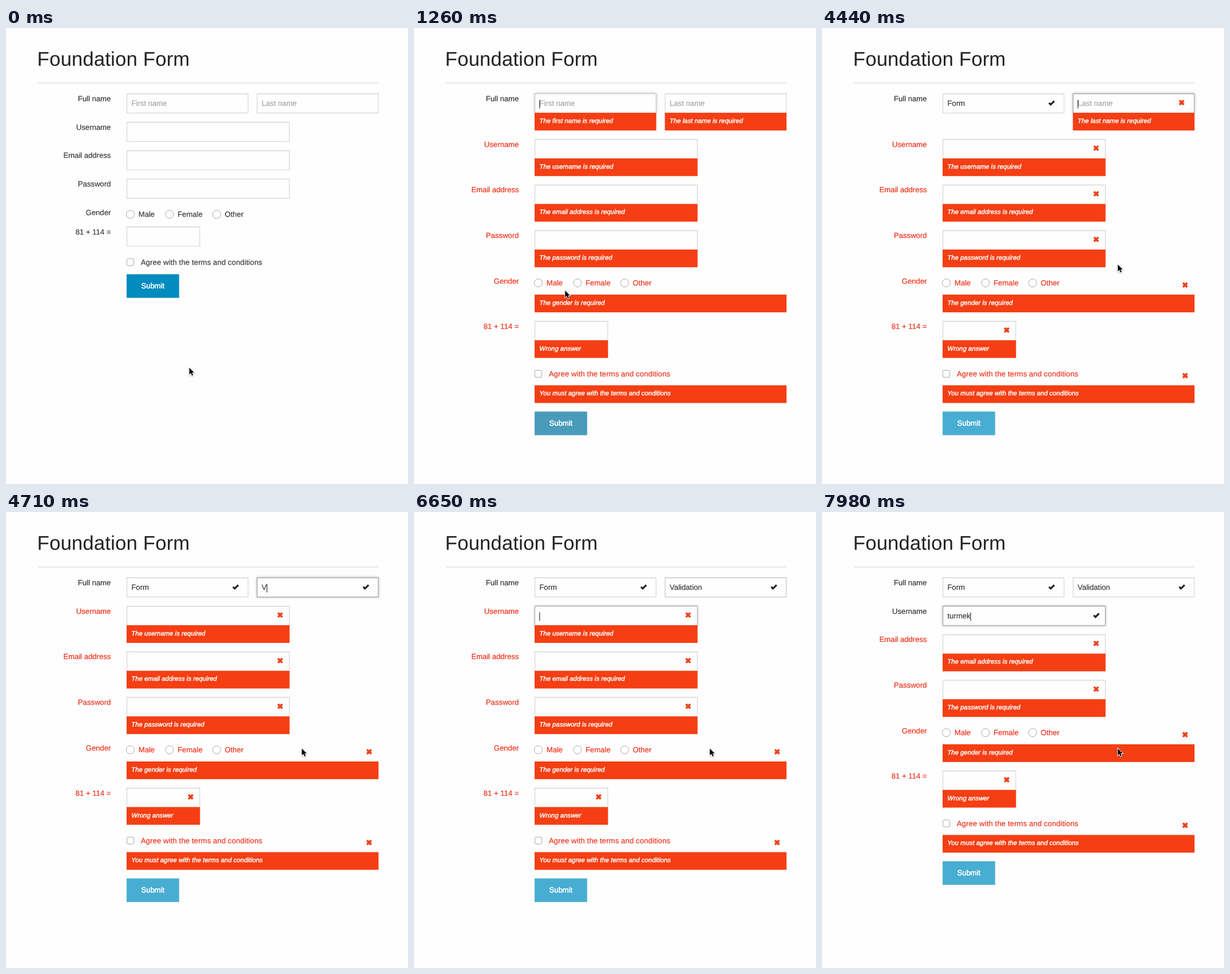
Recreate the animation shown at these times as an HTML page. Size 703 by 797 pixels, loop 8 s.

```html
<!DOCTYPE html>
<html lang="en">
<head>
<meta charset="utf-8">
<title>Foundation Form</title>
<style>
  html, body { margin: 0; width: 100%; height: 100%; overflow: hidden; background: #fefefe; }
  svg { display: block; width: 703px; height: 797px; }
  text { font: 14px "Liberation Sans", Arial, Helvetica, sans-serif; fill: #3a3a3a; stroke: #3a3a3a; stroke-width: .2px; text-rendering: geometricPrecision; white-space: pre; }
  .title { font-size: 37px; fill: #222; stroke: none; letter-spacing: .2px; }
  .label { text-anchor: end; }
  .terms { letter-spacing: .12px; }
  .err .tint { fill: #f0301a; stroke: #f0301a; }
  .hint { fill: #aaa; stroke: #aaa; stroke-width: .3px; }
  .box { fill: #fefefe; stroke: #ccc; }
  .focus { filter: drop-shadow(0 0 2px rgba(0,0,0,.3)); }
  .round { fill: #fff; stroke: #a2a2a2; }
  .bar { fill: #f53e13; }
  .msg { font-size: 12px; font-style: italic; fill: #fff; stroke: #fff; stroke-width: .5px; letter-spacing: .05px; }
  .cross { stroke: #f0401a; stroke-width: 3.9; }
  .check { stroke: #222; stroke-width: 3.4; fill: none; }
  .submit { text-anchor: middle; fill: #fff; stroke: #fff; stroke-width: .55px; }
  .ring { filter: drop-shadow(0 0 2px #5b9dd9) drop-shadow(0 0 1px #5b9dd9); }
  .arrow { fill: #000; stroke: #fff; stroke-width: 2; paint-order: stroke; filter: drop-shadow(0 1px 1px rgba(0,0,0,.3)); }
</style>
</head>
<body>
<svg id="stage" viewBox="0 0 750 850" preserveAspectRatio="none"></svg>
<script>
const LOOP = 8000, SHOWN = 1260, ICONS = 1510;
const LEFT = 225, BAR = 33, LINE = 18;

// y: resting top, grow: extra height while the row has an error
const rows = [
  { y: 122, grow: 32, label: 'Full name', plain: true },
  { y: 175, grow: 32, label: 'Username' },
  { y: 228, grow: 32, label: 'Email address' },
  { y: 281, grow: 32, label: 'Password' },
  { y: 334, grow: 48, label: 'Gender' },
  { y: 370, grow: 32, label: '81 + 114 =' },
  { y: 423, grow: 48 },
  { y: 459, grow: 0 }
];

const fields = [
  { row: 0, x: LEFT, w: 227, inset: 24, hint: 'First name', msg: 'The first name is required',
    value: 'Form', keys: [3030, 3480, 3660, 3840], need: 1, focus: [1260, 4010], fade: 1160, caret: 1260 },
  { row: 0, x: 468, w: 227, inset: 24, hint: 'Last name', msg: 'The last name is required',
    value: 'Validation', keys: [4710, 4880, 4970, 5150, 5240, 5330, 5590, 5680, 5860, 6130],
    need: 1, focus: [4010, 6390], fade: 4010, caret: 4270 },
  { row: 1, x: LEFT, w: 304, msg: 'The username is required',
    value: 'turmek', keys: [6910, 7000, 7090, 7260, 7800, 7980], need: 6, focus: [6390, LOOP], fade: 6390, caret: 6390,
    long: ['The username must be more than 6 and less than 30', 'characters long'] },
  { row: 2, x: LEFT, w: 304, msg: 'The email address is required' },
  { row: 3, x: LEFT, w: 304, msg: 'The password is required' },
  { row: 4, x: LEFT, w: 470, msg: 'The gender is required', bare: true },
  { row: 5, x: LEFT, w: 137, msg: 'Wrong answer' },
  { row: 6, x: LEFT, w: 470, msg: 'You must agree with the terms and conditions', bare: true }
];

const stage = document.getElementById('stage');
const text = (cls, x, y, s) => `<text class="${cls}" x="${x}" y="${y}">${s}</text>`;
const rect = (cls, x, y, w, h, more = '') => `<rect class="${cls}" x="${x}" y="${y}" width="${w}" height="${h}" ${more}/>`;

function fieldMarkup(f) {
  const bar = f.bare ? 35 : 36, tx = f.x + 9;
  const input = f.bare ? '' :
    rect('box', f.x + .5, .5, f.w - 1, 36) +
    rect('', f.x + 1, 1, f.w - 2, 1, 'opacity=".06"') +
    text('hint', tx, 23.5, f.hint || '') + text('value', tx, 23.5, '') +
    rect('caret', tx, 12, 1, 16);
  return `<g class="field">${input}
    <g class="error">${rect('bar', f.x, bar, f.w, BAR)}${text('msg', tx, bar + 19, f.msg)}${text('msg', tx, bar + 19 + LINE, '')}</g>
    <g transform="translate(${f.x + f.w - (f.inset || 17.5)} 17)">
      <path class="cross" d="M-4-4 4 4M-4 4 4-4"/>
      <path class="check" d="M-4.5.6-1.3 3.7 5.4-2.9"/>
    </g></g>`;
}

function extras(i) {
  if (i === 4) return [['Male', 232, 247.2], ['Female', 305, 320], ['Other', 393, 408]]
    .map(([s, cx, x]) => `<circle class="round" cx="${cx}" cy="13.3" r="7.5"/>` + text('tint', x, 18, s)).join('');
  if (i === 6) return rect('round', 225.5, 7, 13, 13, 'rx="2.5"') +
    text('tint terms', 251.5, 18, 'Agree with the terms and conditions');
  if (i === 7) return rect('button', LEFT, 0, 98, 44) + text('submit', 274, 26.5, 'Submit');
  return '';
}

stage.innerHTML = text('title', 58.2, 70, 'Foundation Form') + rect('', 59, 102, 636, 1, 'fill="#d0d0d0"') +
  rows.map((r, i) => `<g class="row">${r.label ? text('label' + (r.plain ? '' : ' tint'), 195.6, 14.5, r.label) : ''}
    ${extras(i)}${fields.filter(f => f.row === i).map(fieldMarkup).join('')}</g>`).join('') +
  '<path class="arrow" d="M0 0V12.5L2.9 9.8 5 14.6 7 13.7 5 9.1H9Z"/>';

const all = s => [...stage.querySelectorAll(s)];
all('.row').forEach((el, i) => rows[i].el = el);
all('.field').forEach((el, i) => {
  const part = s => el.querySelector(s);
  Object.assign(fields[i], { box: part('.box'), hintEl: part('.hint'), valueEl: part('.value'), caretEl: part('.caret'),
    error: part('.error'), barEl: part('.bar'), msgs: el.querySelectorAll('.msg'), cross: part('.cross'), check: part('.check') });
});
const button = stage.querySelector('.button'), arrow = stage.querySelector('.arrow');

const clamp = v => Math.max(0, Math.min(1, v));
const ease = v => v * v * (3 - 2 * v);
const mix = (a, b, p) => a + (b - a) * p;
const rgb = (a, b, p) => `rgb(${a.map((v, i) => Math.round(mix(v, b[i], p)))})`;
const show = (el, on) => { el.style.display = on ? '' : 'none'; };
// pointer progress advances in n even jumps
const hop = (t, from, to, n) => t < from ? 0 :
  ease(Math.min(n, Math.floor((t - from) / (to - from) * (n - 1)) + 1) / n);

function drawField(f, t) {
  const typed = f.keys ? f.keys.filter(k => k <= t) : [];
  const ok = typed.length > 0 && typed.length >= f.need;
  f.bad = t >= SHOWN && !ok;
  f.wrapped = !!f.long && f.bad && typed.length > 0;
  show(f.error, f.bad);
  show(f.cross, f.bad && t >= ICONS);
  show(f.check, ok);
  f.barEl.setAttribute('height', f.wrapped ? BAR + LINE : BAR);
  f.msgs[0].textContent = f.wrapped ? f.long[0] : f.msg;
  f.msgs[1].textContent = f.wrapped ? f.long[1] : '';
  if (f.bare) return;

  show(f.hintEl, !typed.length);
  f.valueEl.textContent = f.value ? f.value.slice(0, typed.length) : '';
  const focused = !!f.focus && t >= f.focus[0] && t < f.focus[1];
  f.box.classList.toggle('focus', focused);
  const level = focused ? ease(clamp((t - f.fade) / 450))
    : f.focus && t >= f.focus[1] ? 1 - ease(clamp((t - f.focus[1]) / 450)) : 0;
  f.box.style.stroke = rgb([204, 204, 204], [145, 145, 145], level);
  const since = t - (typed.length ? typed[typed.length - 1] : f.caret);
  show(f.caretEl, focused && Math.floor(since / 500) % 2 === 0);
  f.caretEl.setAttribute('x', f.x + 9 + (typed.length ? f.valueEl.getComputedTextLength() : 0));
}

function draw(t) {
  fields.forEach(f => drawField(f, t));
  let shift = 0;
  rows.forEach((r, i) => {
    r.el.setAttribute('transform', `translate(0 ${r.y + shift})`);
    const own = fields.filter(f => f.row === i), bad = own.some(f => f.bad);
    r.el.classList.toggle('err', bad);
    if (bad) shift += r.grow + (own.some(f => f.wrapped) ? LINE : 0);
  });

  button.style.fill = t < SHOWN ? rgb([0, 140, 190], [0, 112, 153], clamp((t - 820) / 250))
    : t < 1340 ? '#499bba' : '#48add2';
  button.classList.toggle('ring', t >= 1080 && t < SHOWN);

  const a = hop(t, 350, 1080, 9), b = hop(t, 1510, 2310, 10);
  const x = mix(mix(342, 282, a), 552, b), y = mix(mix(633.3, 489.5, a), 441, b);
  arrow.setAttribute('transform', `translate(${x} ${y})`);
}

function tick() {
  draw(performance.now() % LOOP);
  requestAnimationFrame(tick);
}
tick();
</script>
</body>
</html>
```
